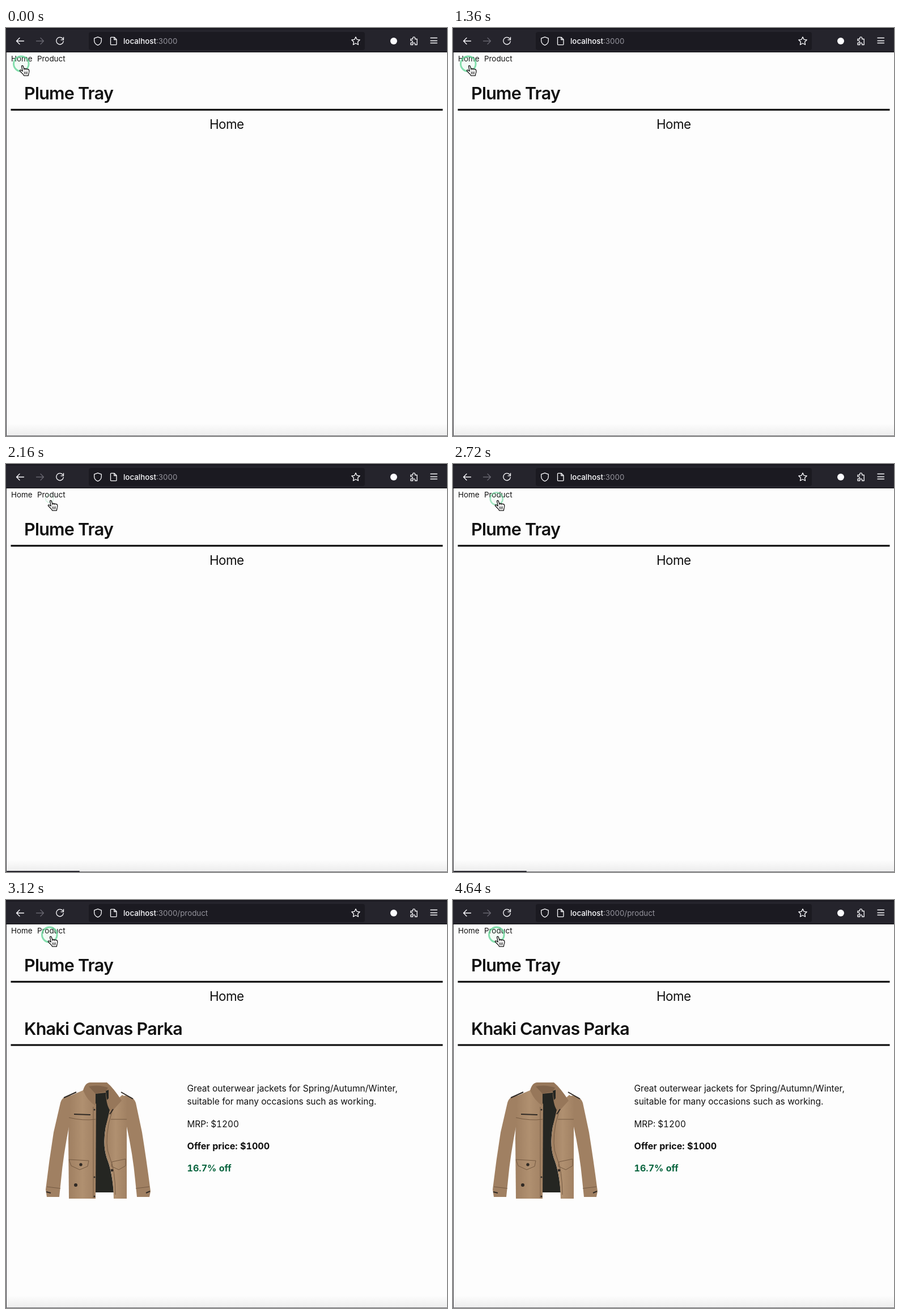
Animation of 778x720 px, one loop 4.72 s. Source, as an HTML page:

```html
<!DOCTYPE html>
<html lang="en">
<head>
<meta charset="utf-8">
<title>Shop page navigation</title>
<style>
  html, body { margin: 0; width: 100%; height: 100%; overflow: hidden; background: #fdfdfd; }
  svg { display: block; }
  text { font: 15.53px Inter, sans-serif; font-optical-sizing: none; fill: #111; }
  .nav { font-size: 13.4px; }
  .url { font-size: 13.35px; fill: #94939c; }
  .host { font-weight: 500; fill: #fbfbfe; }
  .title { font-size: 30.5px; font-weight: 600; letter-spacing: -.025em; }
  .label { font-size: 22.4px; letter-spacing: -.025em; }
  .price { font-size: 15.35px; font-variant-numeric: tabular-nums; }
  .strong { font-size: 16.1px; font-weight: 700; }
  .icons { fill: none; stroke: #fbfbfe; stroke-width: 1.3; stroke-linecap: round; stroke-linejoin: round; }
</style>
</head>
<body>
<svg width="778" height="720" viewBox="0 0 778 720">
  <defs>
    <linearGradient id="shade" x2="0" y2="1">
      <stop stop-color="#fdfdfd"/><stop offset="1" stop-color="#ededed"/>
    </linearGradient>
    <linearGradient id="cloth">
      <stop stop-color="#9f7f61"/><stop offset=".5" stop-color="#b09070"/><stop offset="1" stop-color="#a18163"/>
    </linearGradient>
  </defs>
  <rect width="778" height="720" fill="#fdfdfd"/>
  <rect y="698" width="778" height="21" fill="url(#shade)"/>

  <!-- browser toolbar -->
  <rect width="778" height="43" fill="#25242c"/>
  <rect width="778" height="2.5" fill="#1a1920"/>
  <rect y="42" width="778" height="1" fill="#0c0c10"/>
  <rect x="146" y="7" width="487" height="32" rx="4" fill="#1b1a21"/>
  <g class="icons">
    <path d="M31.5 23H18.5M24 17.5L18.5 23L24 28.5"/>
    <path stroke="#67666f" d="M53.5 23H66.5M61 17.5L66.5 23L61 28.5"/>
    <path d="M100.3 19.2A6.3 6.3 0 1 0 101.3 23.5M101.5 16.3V20.8H97"/>
    <path d="M162 15.8L168.3 18.2V22C168.3 26 165.5 29 162 30.3C158.5 29 155.7 26 155.7 22V18.2Z"/>
    <path d="M185.5 16.3H191L195 20.3V28.5Q195 29.7 193.8 29.7H185.7Q184.5 29.7 184.5 28.5V17.3Q184.5 16.3 185.5 16.3ZM190.8 16.5V20.5H194.8"/>
    <path d="M617 15.8L619.2 20.4L624.2 21L620.5 24.5L621.5 29.5L617 27L612.5 29.5L613.5 24.5L609.8 21L614.8 20.4Z"/>
    <circle cx="684" cy="23" r="6" fill="#fbfbfe" stroke="none"/>
    <path d="M714 19.5H717.6V17.8A2 2 0 0 1 721.6 17.8V19.5H725.2V29.5H721.6V28A1.9 1.9 0 0 0 717.8 28V29.5H714V26.2H715.5A1.9 1.9 0 0 0 715.5 22.4H714Z"/>
    <path d="M749 17.5H760.5M749 22.5H760.5M749 26.5H760.5"/>
  </g>
  <text class="url" x="207" y="28"><tspan class="host">localhost</tspan>:3000<tspan id="path">/product</tspan></text>

  <!-- page -->
  <text class="nav" x="9" y="59">Home</text>
  <text class="nav" x="55" y="59">Product</text>
  <text class="title" x="32" y="126">Plume Tray</text>
  <rect x="8.5" y="142.7" width="762" height="3.1" fill="#0b0b0b"/>
  <text class="label" x="359" y="177.5">Home</text>

  <g id="product">
    <text class="title" x="32" y="238">Khaki Canvas Parka</text>
    <rect x="8.5" y="254.4" width="762" height="3.1" fill="#0b0b0b"/>
    <text x="319.5" y="338">Great outerwear jackets for Spring/Autumn/Winter,</text>
    <text x="319.5" y="361">suitable for many occasions such as working.</text>
    <text class="price" x="319.5" y="400.5">MRP: $1200</text>
    <text class="price strong" x="319.5" y="439.5">Offer price: $1000</text>
    <text class="price strong" x="319.5" y="478.5" style="fill:#0b6640">16.7% off</text>

    <g stroke-linejoin="round">
      <path fill="#a08062" d="M114 345Q99 346 96 358L84 410Q76 460 70 511L72 524H94L97 495Q101 450 112 395Z"/>
      <path fill="#a08062" d="M209 345Q225 346 229 358L240 410Q248 460 255 514L253 524H231L228 495Q224 450 212 395Z"/>
      <path fill="#252622" d="M157 336H181L184 372L176 400Q170 432 178 456Q187 478 190 516H157Z"/>
      <path fill="url(#cloth)" d="M138 335L112 346L110 420L111 527H158L159 360Z"/>
      <path fill="url(#cloth)" d="M185 362L205 344L213 348V527H190Q189 482 178 456Q170 432 176 400Z"/>
      <path fill="#97775a" d="M136 336Q140 321 150 322H178Q190 332 204 354L186 374Q177 366 176 340L158 342V363Q144 355 136 336Z"/>
      <path fill="#80634a" d="M146 329Q162 325 180 331L176 338L158 342Z"/>
      <path fill="#252622" d="M176 337L181 335V350L178 353Z"/>
      <g fill="none" stroke="#755a42">
        <path d="M111 384Q136 390 158 387M185 387H213M111 458L146 460L144 470L130 476L115 469ZM187 462L211 457V469L199 476L186 470Z"/>
        <path d="M188 370L181 395Q174 434 183 454Q193 478 193 520M154 365V526M72 506L96 509M229 509L253 506"/>
      </g>
      <path fill="none" stroke="#302a25" stroke-width="2" d="M120 378L149 379M102 349L124 339M203 339L224 351M183 378L189 369M71 515L79 517M247 517L254 514"/>
      <g fill="#302a25">
        <circle cx="132" cy="467" r="2.7"/><circle cx="187" cy="477" r="2.3"/><circle cx="123" cy="503" r="3"/>
        <circle cx="156" cy="370" r="1.5"/><circle cx="156" cy="489" r="1.5"/><circle cx="156" cy="523" r="1.5"/>
      </g>
    </g>
  </g>

  <path d="M.5 43V720" stroke="#37363c"/>
  <path d="M0 719.5H778" stroke="#707074"/>
  <rect id="status" x="1" y="718" height="2" rx="1" fill="#25242c"/>

  <g id="pointer">
    <circle id="ring" fill="#6bdd9f" fill-opacity=".07" stroke="#62d596" stroke-opacity=".78" stroke-width="3"/>
    <g transform="translate(1.5 3)" stroke-linecap="round" stroke-linejoin="round">
      <path fill="#fff" stroke="#111" stroke-width="1.3" d="M-.8 1.4Q-.3 -.4 1.4 .4Q2 .8 3.4 6Q5 4.5 6.5 6.2Q8.2 5 9.4 6.8Q11.5 6 12.3 8Q13.2 11 11.5 15L11 18H3.5Q2 15 -.5 13L-3.8 9.6Q-4.3 7.5 -2 8L1 10Z"/>
      <path fill="none" stroke="#111" stroke-width="1" d="M3.5 6L4 8M6.5 6.5L7 8M4 11L4.4 15M6.6 11V15M9 11L8.7 15"/>
    </g>
  </g>
</svg>
<script>
const LOOP = 4720, STEP = 80;
const CLICKS = [80, 720, 2080, 2720];
const PULSE = [[.83, .75], [.53, .3], [.75, .65]]; // ring scale and opacity
const find = id => document.getElementById(id);
const [path, product, status, pointer, ring] = ["path", "product", "status", "pointer", "ring"].map(find);
const show = (node, on) => node.setAttribute("visibility", on ? "visible" : "hidden");
const within = (t, from, to) => t >= from && t < to;

function draw(t) {
  const loaded = t >= 2800;
  show(path, loaded);
  show(product, loaded);

  const transferring = within(t, 160, 800);
  show(status, transferring || within(t, 2160, 2960));
  status.setAttribute("width", transferring ? 155 : 129);

  const progress = Math.min(1, Math.max(0, (t - 1440) / 560));
  const eased = 1 - (1 - progress) ** 1.8;
  pointer.setAttribute("transform", `translate(${26.8 + 50 * eased} ${63.2 - 2 * eased})`);

  const click = CLICKS.find(start => within(t, start, start + PULSE.length * STEP));
  const [scale, opacity] = click === undefined ? [1, 1] : PULSE[(t - click) / STEP];
  ring.setAttribute("r", 13.3 * scale);
  ring.setAttribute("stroke-width", 3 * scale);
  ring.setAttribute("opacity", opacity);
}

const start = performance.now();
function tick() {
  const elapsed = (performance.now() - start) % LOOP;
  draw(Math.floor(elapsed / STEP) * STEP);
  requestAnimationFrame(tick);
}
tick();
</script>
</body>
</html>
```
